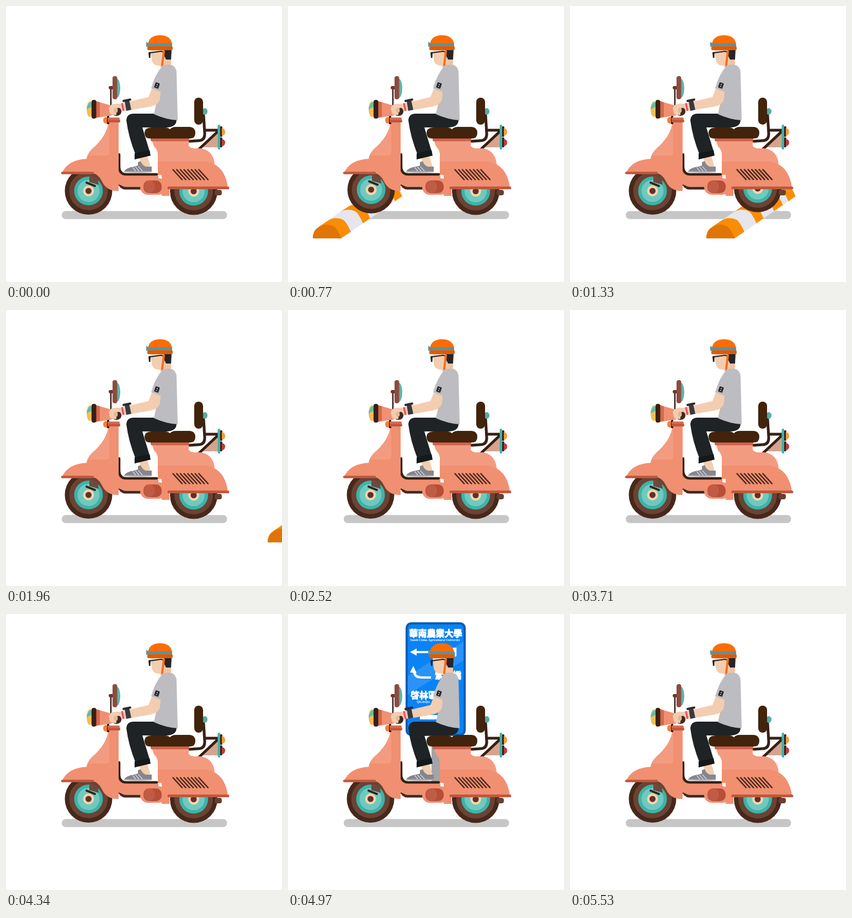
An HTML page with a canvas that plays this animation: 500 by 500 pixels, repeating every 6370 ms.

```html
<!DOCTYPE html>
<html lang="en">
<head>
<meta charset="utf-8">
<title>Scooter ride</title>
<style>
html, body { margin: 0; width: 100%; height: 100%; overflow: hidden; background: #fff; }
canvas { display: block; width: 100vw; height: 100vh; }
</style>
</head>
<body>
<canvas id="stage" width="500" height="500"></canvas>
<script>
const ctx = document.getElementById('stage').getContext('2d');
const LOOP = 6370, STEP = 70;

const C = {
  body: '#f18f71', light: '#f39b80', trim: '#bf583f', brown: '#47281a', dark: '#382015',
  mid: '#6b4334', teal: '#3fb3a8', aqua: '#6fc9bf', cream: '#f3d3b0', seat: '#42230c',
  skin: '#f3cdb0', shirt: '#bdbcc0', pants: '#1e2325', orange: '#fa6d06', ground: '#c6c6c6'
};

function fill(d, color) {
  ctx.fillStyle = color;
  ctx.fill(new Path2D(d));
}

function line(d, color, width, cap = 'round') {
  ctx.strokeStyle = color;
  ctx.lineWidth = width;
  ctx.lineCap = cap;
  ctx.lineJoin = 'round';
  ctx.stroke(new Path2D(d));
}

function box(x, y, w, h, r, color) {
  ctx.fillStyle = color;
  ctx.beginPath();
  ctx.roundRect(x, y, w, h, r);
  ctx.fill();
}

function oval(x, y, rx, ry, color) {
  ctx.fillStyle = color;
  ctx.beginPath();
  ctx.ellipse(x, y, rx, ry, 0, 0, Math.PI * 2);
  ctx.fill();
}

function shifted(dx, dy, draw) {
  ctx.save();
  ctx.translate(dx, dy);
  draw();
  ctx.restore();
}

// smooth pulse around a centre time
function pulse(t, centre, half) {
  const u = (t - centre) / half;
  return Math.abs(u) < 1 ? Math.cos(u * Math.PI / 2) ** 2 : 0;
}

function speedBump(left) {
  const arch = 'M0 0Q0 -14 10 -20Q23 -29 38 -22Q44 -18 52 0Z';
  const ends = [18, 40, 53, 72, 88, 98, 111];
  for (let s = 110; s >= 0; s--) {
    const band = ends.findIndex(e => s < e);
    shifted(left + s, 421 - s * 0.69, () => fill(arch, band % 2 ? '#e6e6ec' : '#fb8d05'));
  }
  shifted(left, 421, () => fill(arch, '#e17406'));
}

function label(text, x, y, font, align = 'left', weight = 0) {
  ctx.fillStyle = ctx.strokeStyle = '#fff';
  ctx.font = font;
  ctx.textAlign = align;
  ctx.textBaseline = 'middle';
  ctx.fillText(text, x, y);
  if (weight) {
    ctx.lineWidth = weight;
    ctx.strokeText(text, x, y);
  }
}

function roadSign() {
  const cjk = '900 16px "Noto Sans CJK TC", "Noto Sans CJK SC", "Noto Sans CJK", sans-serif';
  box(47, 200, 15, 135, 0, '#a2a4a8');
  box(0, 15, 109, 206, 10, '#0b5fb4');
  box(4, 19, 101, 198, 7, '#0a83f6');
  ctx.save();
  ctx.beginPath();
  ctx.roundRect(4, 19, 101, 198, 7);
  ctx.clip();
  fill('M4 112L105 50V84L4 146Z', 'rgba(255,255,255,.13)');
  ctx.restore();
  label('華南農業大學', 54.5, 35, cjk, 'center', 0.9);
  label('South China Agricultural University', 53.5, 47.5, 'bold 5.8px "Liberation Serif", serif', 'center');
  line('M14 69H45', '#fff', 4, 'butt');
  fill('M8 69L20 62.5V75.5Z', '#fff');
  label('正門', 93, 69, cjk, 'right', 0.9);
  line('M15 103Q16 115 29 115H46', '#fff', 4, 'butt');
  fill('M14 94L20 107L8 106Z', '#fff');
  label('紫荊橋', 101, 111, cjk, 'right', 0.9);
  label('啓林區', 9, 147, cjk, 'left', 0.9);
  label('QiLinQu', 32, 159.5, 'bold 6px "Liberation Sans", sans-serif', 'center');
  line('M26 187H66', '#fff', 8, 'butt');
}

function wheel(x, y) {
  const rings = [[43, C.brown], [35, C.mid], [26, C.teal], [20, C.aqua], [10, C.cream], [5.5, '#5d3324']];
  for (const [r, color] of rings) oval(x, y, r, r, color);
}

function frontWheel() {
  wheel(149.5, 335);
  fill('M151 309L166 312L168 324L151 319Z', '#6a4a3c');
  line('M146 320L161 326', C.dark, 4);
}

function rack() {
  fill('M384 227V256H354Z', '#d4a48e');
  line('M384 225H362M382 229L350 259', C.dark, 5);
  line('M358 198L360 232Q360 244 348 244L333 245', C.dark, 5);
  oval(360, 191, 5, 6, '#58aaa1');
  box(341, 166, 16, 49, 8, C.seat);
  box(387, 218, 5, 19, 2, C.dark);
  box(387, 238, 5, 18, 2, C.dark);
  fill('M391 221Q397 222 397 228Q397 234 391 235Z', '#f79a42');
  fill('M391 241Q397 242 397 247Q397 253 391 254Z', '#c4383c');
  box(383.5, 215, 4.5, 45, 2, C.teal);
}

function bodyShell() {
  box(378, 333, 13, 10, 4, '#69402f');
  line('M204 319Q208 330 216 330H246', C.brown, 5);
  fill('M204 290Q208 305 218 307H276V327H213L204 323Z', C.body);
  line('M205 269V290Q205 305 218 305H273', C.dark, 4.5);
  fill('M263 240H331V253Q333 258 344 258C364 256 377 268 378 287H275V267Q274 260 268 254Z', C.light);
  fill('M275 282H364Q396 288 402 328H296V344H282V306H275Z', C.body);
  line('M295 329.5H402', C.trim, 5);
  for (let i = 0; i < 8; i++) line(`M${302.5 + i * 6.7} 296.5L${319 + i * 6.7} 314.5`, C.brown, 2.5);
  box(243, 312, 47, 30, 14, C.body);
  box(249, 316, 33, 23, 10, '#b64e38');
  oval(260, 327.5, 10, 11, '#c05c45');
}

function frontShell() {
  fill('M102 301Q114 278 146 277Q147 268 156 259Q183 236 186 209H204V335H198Q181 333 174 318Q167 304 157 303Z', C.body);
  fill('M186 211H187V267Q187 271 180 271H148Q150 265 156 259Q183 236 186 211Z', C.light);
  line('M102 302.5H157', C.trim, 4.5);
  line('M190 151V181', C.dark, 2.6);
  box(186, 145, 11, 6, 3, '#68392e');
  oval(201, 149, 6, 17, '#63b2a8');
  box(193, 127, 8.5, 42, 4, '#8d4c40');
  oval(181, 207, 5, 6, '#ee8143');
  line('M185 199V214', C.dark, 4, 'butt');
  box(184, 202, 22, 5, 2, '#d76b51');
  box(184, 206, 23, 5, 2, C.trim);
  oval(152, 187, 6, 14, '#f4bd56');
  fill('M157 173Q148 174 146 187L157 182Z', '#60bcaf');
  fill('M162 172L193 181V198L162 203Z', C.body);
  fill('M162 172L170 174.5V200.5L162 203Z', '#d5694d');
  box(155, 170, 8.5, 34, 4, C.dark);
  oval(200, 191, 9, 8, '#3b2923');
}

function seat() {
  box(262, 238, 70, 7, 2, '#d0614a');
  fill('M261 240Q251 240 251 230Q251 220 265 220H288Q294 220 297 223.5Q300 219 308 219H333Q343 220 343 230Q343 240 333 240Z', C.seat);
}

function leg() {
  fill('M242 274L256 271L262 292H244Z', C.skin);
  fill('M214 300Q217 293 232 291L239 289V283L244 281Q246 288 253 291L264 291V300Z', '#85868c');
  fill('M214 299H264V301Q240 303 214 301Z', '#a9aab0');
  line('M230 293L235 299M235 292L241 299M240 291L247 299', '#d5d6de', 1.3);
  fill('M218 207Q219 195 231 195H270L309 206Q309 219 292 220H247L261 266L235 270Q222 238 218 207Z', C.pants);
  fill('M233 267L260 261L262 271L233 278Z', '#15191a');
}

function head() {
  fill('M283 95H299V111H279Z', '#efc3a5');
  fill('M262 79H289V101Q284 109 275 108Q266 107 264 98Z', C.skin);
  fill('M287 79H300L299 97H290L287 91Z', '#25252a');
  line('M260 85L281 82L287 84', '#202226', 2);
  fill('M258 84L262 83L261.5 94H259Z', '#202226');
  line('M286 82L283 107', '#f2701d', 4);
  fill('M257 70Q259 53 279 53Q299 53 301 70V75H257Z', C.orange);
  fill('M254 65L259 68H301V72.5H259L254 74Z', '#5593a5');
  box(256, 73, 46, 7, 2, '#dc5d08');
}

function hand() {
  fill('M203 178L219 174L221 189L206 191Z', C.skin);
  fill('M186 186Q188 177 198 177H207L209 185Q202 186 200 197Q190 200 186 186Z', C.skin);
  oval(204, 191, 5, 6.5, '#3b2923');
  oval(192, 191, 4.5, 6, '#f0cdb0');
  oval(199, 189, 3.5, 5, '#e4b898');
}

function torso() {
  fill('M283 109Q290 105 300 107Q309 110 309 122L311 207Q290 206 268 196L277 153L263 149Q270 124 283 109Z', C.shirt);
  fill('M264 150L280 153L279 169Q276 179 263 182L222 189L220 174L258 165Z', C.skin);
  fill('M284 112L263 149L279 155L287 129Z', C.shirt);
  ctx.save();
  ctx.translate(273.5, 144);
  ctx.rotate(0.32);
  box(-4, -5, 8, 10, 1, '#27282b');
  box(-1, -2.5, 2, 1.6, 0, '#d4d4d8');
  box(-1, 1, 2, 1.6, 0, '#d4d4d8');
  ctx.restore();
  hand();
  line('M210 176L213 190', '#ef4b69', 3.2, 'butt');
  fill('M215 172L223 170L227 188L218 190Z', '#393a3e');
  line('M213 172L225 169.5', '#2b2c30', 4);
}

function scooter(t) {
  const frontLift = 8 * pulse(t, 860, 140);
  const rearLift = 8 * pulse(t, 1390, 140);
  const nose = pulse(t, 980, 140), tail = pulse(t, 1450, 130);
  shifted(0, -rearLift, () => wheel(340, 335.5));
  shifted(frontLift / 2, -frontLift, frontWheel);
  ctx.save();
  ctx.translate(245, 336 - 4 * (nose + tail));
  ctx.rotate(0.01 * (nose - tail));
  ctx.translate(-245, -336);
  rack();
  bodyShell();
  frontShell();
  leg();
  seat();
  head();
  torso();
  ctx.restore();
}

function draw(now) {
  const t = Math.floor((now % LOOP) / STEP) * STEP;
  ctx.fillStyle = '#fff';
  ctx.fillRect(0, 0, 500, 500);
  box(101, 371.5, 299.5, 14.5, 7.2, C.ground);
  if (t >= 210 && t < 2030) speedBump(45 + (t - 770) / STEP * 25.24);
  if (t >= 4410 && t < 5530) shifted(213 + (t - 4970) / STEP * 36, 0, roadSign);
  scooter(t);
}

const start = performance.now();
function tick() {
  draw(performance.now() - start);
  requestAnimationFrame(tick);
}
tick();
</script>
</body>
</html>
```
